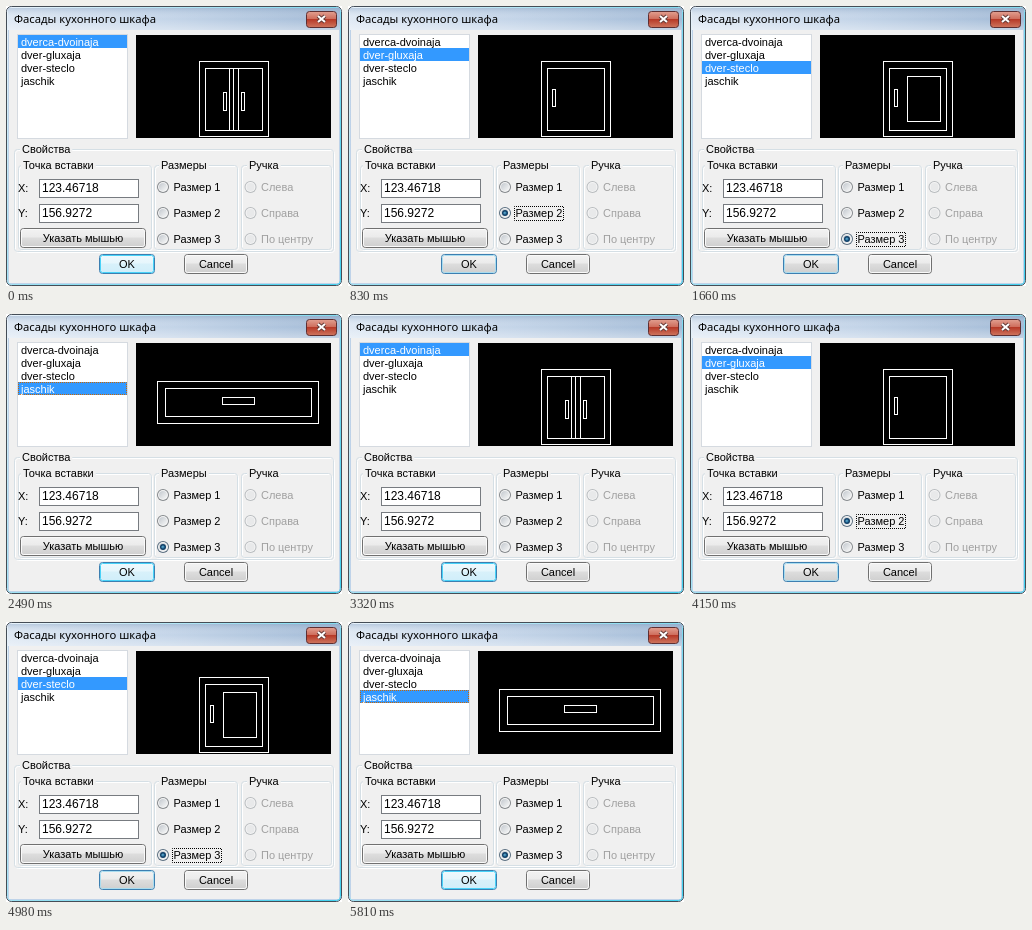
An HTML page with a canvas for the animation above (6640 ms loop, 336x280 px).

```html
<!DOCTYPE html>
<html lang="ru">
<head>
<meta charset="utf-8">
<style>
html, body { margin: 0; width: 100%; height: 100%; overflow: hidden; background: #fff; }
canvas { display: block; }
</style>
</head>
<body>
<canvas id="stage" width="336" height="280"></canvas>
<script>
const ctx = document.getElementById('stage').getContext('2d');
const UI = '11px "Liberation Sans", Arial, sans-serif';
const VALUE = '12px "Liberation Sans", Arial, sans-serif';
const TITLE = '11.25px "Noto Sans", sans-serif';
const STEP = 830;
const items = ['dverca-dvoinaja', 'dver-gluxaja', 'dver-steclo', 'jaschik'];
const sizes = ['Размер 1', 'Размер 2', 'Размер 3'];
const handles = ['Слева', 'Справа', 'По центру'];

// Each outline is left, top, right, bottom.
const frame = [[193, 55, 262, 130], [199, 62, 256, 124]];
const knob = [204, 83, 207, 100];
const states = [
  { size: -1, glow: true,
    outlines: [...frame, [223, 62, 227, 124], [227, 62, 232, 124], [217, 86, 220, 104], [235, 86, 238, 104]] },
  { size: 1, sizeFocus: true, outlines: [...frame, knob] },
  { size: 2, sizeFocus: true, outlines: [...frame, knob, [217, 70, 250, 115]] },
  { size: 2, glow: true, listFocus: true,
    outlines: [[151, 67, 312, 109], [159, 74, 305, 102], [216, 83, 248, 90]] }
];

function fill(x, y, w, h, color) {
  ctx.fillStyle = color;
  ctx.fillRect(x, y, w, h);
}

function outline(l, t, r, b, color) {
  ctx.strokeStyle = color;
  ctx.strokeRect(l + 0.5, t + 0.5, r - l, b - t);
}

function rounded(l, t, r, b, radius, stroke, paint) {
  ctx.beginPath();
  ctx.roundRect(l + 0.5, t + 0.5, r - l, b - t, radius);
  if (paint) { ctx.fillStyle = paint; ctx.fill(); }
  if (stroke) { ctx.strokeStyle = stroke; ctx.stroke(); }
}

function text(s, x, y, color = '#000', font = UI, align = 'left') {
  ctx.font = font;
  ctx.textAlign = align;
  ctx.fillStyle = color;
  ctx.fillText(s, x, y);
}

function gradient(x0, y0, x1, y1, ...colors) {
  const g = ctx.createLinearGradient(x0, y0, x1, y1);
  colors.forEach(([at, color]) => g.addColorStop(at, color));
  return g;
}

function dotted(l, t, r, b, color) {
  ctx.setLineDash([1, 1]);
  ctx.lineDashOffset = 0.5;
  outline(l, t, r, b, color);
  ctx.setLineDash([]);
}

function group(label, l, t, r, b, textX) {
  rounded(l + 1, t + 1, r + 1, b + 1, 3, '#fff');
  rounded(l, t, r, b, 3, '#d5dfe5');
  ctx.font = UI;
  fill(textX - 2, t - 4, ctx.measureText(label).width + 4, 10, '#f0f0f0');
  text(label, textX, t + 4);
}

function button(label, l, t, r, b, { edge = '#707070', inner = '#fafafa', glow } = {}) {
  const face = glow
    ? gradient(0, t, 0, b, [0, '#f0f9fd'], [0.48, '#e6f6fc'], [0.52, '#d8f1fa'], [1, '#d0eefa'])
    : gradient(0, t, 0, b, [0, '#f3f3f3'], [0.48, '#ebebeb'], [0.52, '#dddddd'], [1, '#cfcfcf']);
  rounded(l, t, r, b, 3, edge, face);
  rounded(l + 1, t + 1, r - 1, b - 1, 2, inner);
  text(label, (l + r) / 2 + 0.5, (t + b) / 2 + 4, '#000', UI, 'center');
}

function radio(label, x, y, checked, disabled) {
  const circle = (radius, color) => {
    ctx.beginPath();
    ctx.arc(x, y, radius, 0, Math.PI * 2);
    ctx.fillStyle = color;
    ctx.fill();
  };
  circle(6, disabled ? '#b8bcbf' : checked ? '#5b6f80' : '#85898d');
  circle(5, '#f6f6f6');
  circle(4, disabled ? '#e8e9ea' : gradient(x - 4, y - 4, x + 4, y + 4, [0, '#c3c8ce'], [1, '#f7f8f8']));
  if (checked) {
    circle(3, '#0e3d66');
    circle(1.6, gradient(x - 2, y - 2, x + 2, y + 2, [0, '#7cc4e4'], [1, '#12608f']));
  }
  text(label, x + 10.5, y + 4, disabled ? '#a0a0a0' : '#000');
}

function field(label, value, top) {
  text(label, 12, top + 13);
  fill(33, top, 100, 19, '#fff');
  outline(33, top, 132, top + 18, '#777b80');
  text(value, 36, top + 13, '#000', VALUE);
}

function drawWindow() {
  fill(0, 0, 336, 280, '#fff');
  rounded(0, 0, 335, 279, 5, '#454d56',
    gradient(0, 0, 0, 280, [0, '#c9daec'], [0.08, '#bdd1e7'], [1, '#bfd3e9']));
  rounded(1, 1, 334, 278, 4, gradient(0, 0, 336, 280, [0, '#eaf3fb'], [0.5, '#8fdff2'], [1, '#3fd0ee']));
  fill(2, 2, 332, 22, gradient(0, 0, 336, 0, [0, '#dfe9f4'], [0.5, '#c3d4e8'], [1, '#a2bad6']));
  fill(2, 2, 332, 22, gradient(0, 2, 0, 24, [0, 'rgba(120,150,185,.35)'], [0.5, 'rgba(255,255,255,0)'], [1, 'rgba(255,255,255,.35)']));
  fill(3, 24, 330, 253, '#f0f0f0');
  text('Фасады кухонного шкафа', 8, 17, '#000', TITLE);

  rounded(300, 5, 330, 21, 3, '#5e2f32',
    gradient(0, 5, 0, 22, [0, '#e3a394'], [0.45, '#cf6f5e'], [0.5, '#b73a28'], [1, '#d07a62']));
  for (const [color, width] of [['#653c38', 4], ['#fff', 2]]) {
    ctx.strokeStyle = color;
    ctx.lineWidth = width;
    ctx.beginPath();
    ctx.moveTo(312, 10); ctx.lineTo(319, 16);
    ctx.moveTo(319, 10); ctx.lineTo(312, 16);
    ctx.stroke();
  }
  ctx.lineWidth = 1;
}

function drawList(selected, focused) {
  fill(11, 28, 111, 105, '#fff');
  outline(11, 28, 121, 132, '#d5dae0');
  items.forEach((name, i) => {
    const top = 29 + i * 13;
    if (i === selected) {
      fill(12, top, 109, 13, '#3399ff');
      if (focused) dotted(12, top, 120, top + 12, '#cc6600');
    }
    text(name, 15, top + 11, i === selected ? '#fff' : '#000');
  });
}

function draw(now) {
  const index = Math.floor(now / STEP) % states.length;
  const state = states[index];
  drawWindow();
  drawList(index, state.listFocus);
  fill(130, 29, 195, 103, '#000');
  state.outlines.forEach(box => outline(...box, '#fff'));

  group('Свойства', 8, 143, 327, 245, 16);
  group('Точка вставки', 12, 159, 145, 243, 17);
  group('Размеры', 148, 159, 231, 243, 155);
  group('Ручка', 235, 159, 325, 243, 243);
  field('X:', '123.46718', 173);
  field('Y:', '156.9272', 198);
  button('Указать мышью', 14, 222, 139, 241);
  sizes.forEach((label, i) => radio(label, 157, 181 + i * 26, i === state.size));
  handles.forEach((label, i) => radio(label, 244.5, 181 + i * 26, false, true));
  if (state.sizeFocus) {
    const y = 181 + state.size * 26;
    dotted(166, y - 7, 215, y + 7, '#000');
  }
  button('OK', 93, 248, 148, 267,
    { edge: '#3c7fb1', inner: state.glow ? '#48d2f8' : '#a9dcef', glow: state.glow });
  button('Cancel', 178, 248, 241, 267);
}

function tick() {
  draw(performance.now() - start);
  requestAnimationFrame(tick);
}

const start = performance.now();
tick();
</script>
</body>
</html>
```
